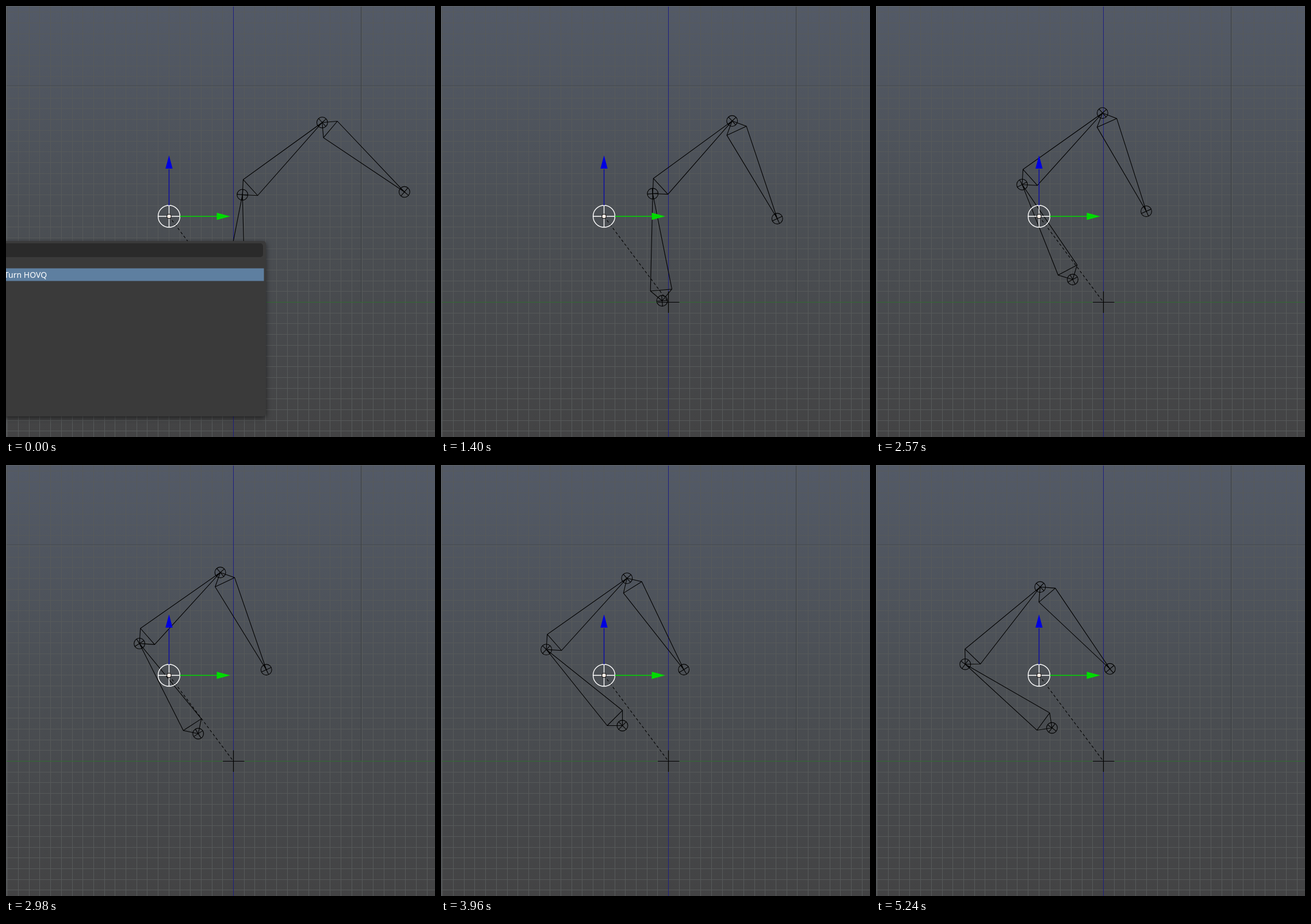
An HTML page with a canvas that plays this animation: 746x750 px, repeating every 5990 ms.

```html
<!DOCTYPE html>
<html lang="en">
<head>
<meta charset="utf-8">
<title>Bone chain</title>
<style>
  html, body { margin: 0; width: 100%; height: 100%; overflow: hidden; background: #4a4d51; }
  canvas { display: block; width: 746px; height: 750px; }
</style>
</head>
<body>
<canvas id="stage" width="746" height="750"></canvas>
<script>
const ctx = document.getElementById('stage').getContext('2d');
const W = 746, H = 750, LOOP = 5990;
const ORIGIN = { x: 395.5, y: 515.5 };
const TARGET = { x: 283.5, y: 366 };
const CELL = 18.7, BONE = 187.2;

// The solver ticks in runs of six, with a tiny pause between runs.
const RUNS = [[220, 750], [850, 1400], [1500, 2020], [2140, 2670],
              [2770, 3310], [3410, 3960], [4060, 4600], [4700, 5240]];
const TICKS = RUNS.flatMap(([a, b]) =>
  [0, 1, 2, 3, 4, 5].map(i => Math.ceil((a + (b - a) * i / 5) / 10) * 10));

// tick, root x, root y, then the angle of each bone in degrees
const POSES = [
  [0, 395.5, 515, 85.2, 42.2, -40.2],
  [3, 395.5, 515, 85.2, 42.2, -40.2],
  [5, 395.5, 515, 86.2, 41.5, -46.9],
  [12, 384.5, 513, 95, 42.5, -65.2],
  [18, 354, 492.5, 107.7, 42.7, -66.5],
  [23, 342, 476, 118, 41.7, -66],
  [31, 322.5, 457, 130.2, 41, -61.1],
  [36, 315.5, 453.5, 135, 41.5, -58.1],
  [42, 309, 456.5, 139.8, 43.8, -53.6],
  [48, 306, 457.5, 143.7, 45.9, -49.6]
];

function slope(i, k) {
  return (POSES[i + 1][k] - POSES[i][k]) / (POSES[i + 1][0] - POSES[i][0]);
}

// Monotone tangent, so that held values do not overshoot
function tangent(i, k) {
  if (i === 0) return slope(0, k);
  if (i === POSES.length - 1) return slope(i - 1, k);
  const a = slope(i - 1, k), b = slope(i, k);
  return a * b <= 0 ? 0 : 2 * a * b / (a + b);
}

function poseAt(tick) {
  let i = 0;
  while (i < POSES.length - 2 && tick >= POSES[i + 1][0]) i++;
  const p = POSES[i], q = POSES[i + 1], d = q[0] - p[0];
  const u = (tick - p[0]) / d, v = 1 - u;
  return [1, 2, 3, 4, 5].map(k =>
    p[k] * (1 + 2 * u) * v * v + q[k] * u * u * (3 - 2 * u) +
    d * u * v * (tangent(i, k) * v - tangent(i + 1, k) * u));
}

function line(x1, y1, x2, y2, color, width = 1) {
  ctx.strokeStyle = color;
  ctx.lineWidth = width;
  ctx.beginPath();
  ctx.moveTo(x1, y1);
  ctx.lineTo(x2, y2);
  ctx.stroke();
}

function poly(points, color) {
  ctx.fillStyle = color;
  ctx.beginPath();
  points.forEach(([x, y]) => ctx.lineTo(x, y));
  ctx.fill();
}

function ring(x, y, r, color, width) {
  ctx.strokeStyle = color;
  ctx.lineWidth = width;
  ctx.beginPath();
  ctx.arc(x, y, r, 0, Math.PI * 2);
  ctx.stroke();
}

function ball(x, y, r, angle, color, width = 1.1) {
  ring(x, y, r, color, width);
  const c = Math.cos(angle) * r, s = Math.sin(angle) * r;
  line(x - c, y - s, x + c, y + s, color, width);
  line(x + s, y - c, x - s, y + c, color, width);
}

function drawGrid() {
  const sky = ctx.createLinearGradient(0, 0, 0, H);
  sky.addColorStop(0, '#535a67');
  sky.addColorStop(0.5, '#4b4f54');
  sky.addColorStop(1, '#434344');
  ctx.fillStyle = sky;
  ctx.fillRect(0, 0, W, H);
  const snap = v => Math.floor(v) + 0.5;
  const grey = '#575a5a';
  for (let n = -30; n < 30; n++) {
    const x = snap(ORIGIN.x + n * CELL), y = snap(ORIGIN.y + n * CELL);
    line(x, 0, x, H, grey);
    line(0, y, W, y, grey);
  }
  line(0, 138.5, W, 138.5, '#474c50');
  line(617.5, 0, 617.5, 516, '#3c4043');
  line(0, ORIGIN.y, W, ORIGIN.y, '#2f6b30');
  line(ORIGIN.x, 0, ORIGIN.x, H, '#1e1e83');
  line(0.5, 0, 0.5, H, '#606468');
  line(0, 0.5, W, 0.5, '#606468');
}

function drawBone(a, b, angle) {
  const dx = (b.x - a.x) * 0.1, dy = (b.y - a.y) * 0.1;
  const l = [a.x + dx + dy, a.y + dy - dx];
  const r = [a.x + dx - dy, a.y + dy + dx];
  ctx.strokeStyle = '#000';
  ctx.lineWidth = 1.1;
  ctx.beginPath();
  ctx.moveTo(a.x, a.y);
  ctx.lineTo(...l);
  ctx.lineTo(b.x, b.y);
  ctx.lineTo(...r);
  ctx.closePath();
  ctx.moveTo(...l);
  ctx.lineTo(...r);
  ctx.stroke();
  ball(b.x, b.y, 9.4, angle, '#000');
}

function drawChain(tick) {
  const [x, y, ...angles] = poseAt(tick);
  let joint = { x, y };
  angles.forEach((deg, i) => {
    const angle = -deg * Math.PI / 180;
    const next = { x: joint.x + BONE * Math.cos(angle), y: joint.y + BONE * Math.sin(angle) };
    if (i === 0) ball(joint.x, joint.y, 9.4, angle, '#000');
    drawBone(joint, next, angle);
    joint = next;
  });
}

function drawTarget() {
  const { x, y } = TARGET;
  ctx.setLineDash([4.5, 4]);
  line(x, y, ORIGIN.x, ORIGIN.y, '#000', 1.1);
  ctx.setLineDash([]);
  line(ORIGIN.x - 18.5, ORIGIN.y, ORIGIN.x + 19, ORIGIN.y, '#000', 1.2);
  line(ORIGIN.x, ORIGIN.y - 19, ORIGIN.x, ORIGIN.y + 18.5, '#000', 1.2);
}

function drawGizmo() {
  const { x, y } = TARGET;
  ball(x, y, 19, 0, '#fff', 1.4);
  line(x, y - 19, x, y - 82, '#0a0aa8', 1.4);
  poly([[x, y - 106], [x - 6.2, y - 83], [x + 6.2, y - 83]], '#0000e0');
  line(x + 19, y, x + 84, y, '#00d400', 1.4);
  poly([[x + 106.5, y], [x + 83, y - 6.2], [x + 83, y + 6.2]], '#00dc00');
  ctx.fillStyle = '#fbeee6';
  ctx.beginPath();
  ctx.arc(x, y, 3.5, 0, Math.PI * 2);
  ctx.fill();
  ring(x, y, 3.8, '#000', 1.1);
}

function panel(x, y, w, h, r, color) {
  ctx.fillStyle = color;
  ctx.beginPath();
  ctx.roundRect(x, y, w, h, r);
  ctx.fill();
}

function drawMenu() {
  ctx.save();
  ctx.shadowColor = 'rgba(0,0,0,0.55)';
  ctx.shadowBlur = 10;
  ctx.shadowOffsetY = 3;
  panel(-20, 409, 472, 305, 5, '#3a3a3a');
  ctx.restore();
  panel(-20, 413, 467, 24, 5, '#2a2a2a');
  ctx.fillStyle = '#5e7fa0';
  ctx.fillRect(0, 456.5, 448.5, 22);
  ctx.fillStyle = '#fff';
  ctx.font = '14px "Noto Sans", "Open Sans", sans-serif';
  ctx.fillText('Turn HOVQ', -3, 473);
}

function frame(now) {
  const t = now % LOOP;
  const tick = TICKS.filter(at => at <= t).length;
  drawGrid();
  drawTarget();
  drawChain(tick);
  drawGizmo();
  if (tick === 0) drawMenu();
  requestAnimationFrame(frame);
}

const start = performance.now();
(function loop() {
  requestAnimationFrame(function step(now) {
    render(Math.max(0, now - start));
    requestAnimationFrame(step);
  });
})();

function render(time) {
  const t = time % LOOP;
  const tick = TICKS.filter(at => at <= t).length;
  drawGrid();
  drawTarget();
  drawChain(tick);
  drawGizmo();
  if (tick === 0) drawMenu();
}
render(0);
</script>
</body>
</html>
```
